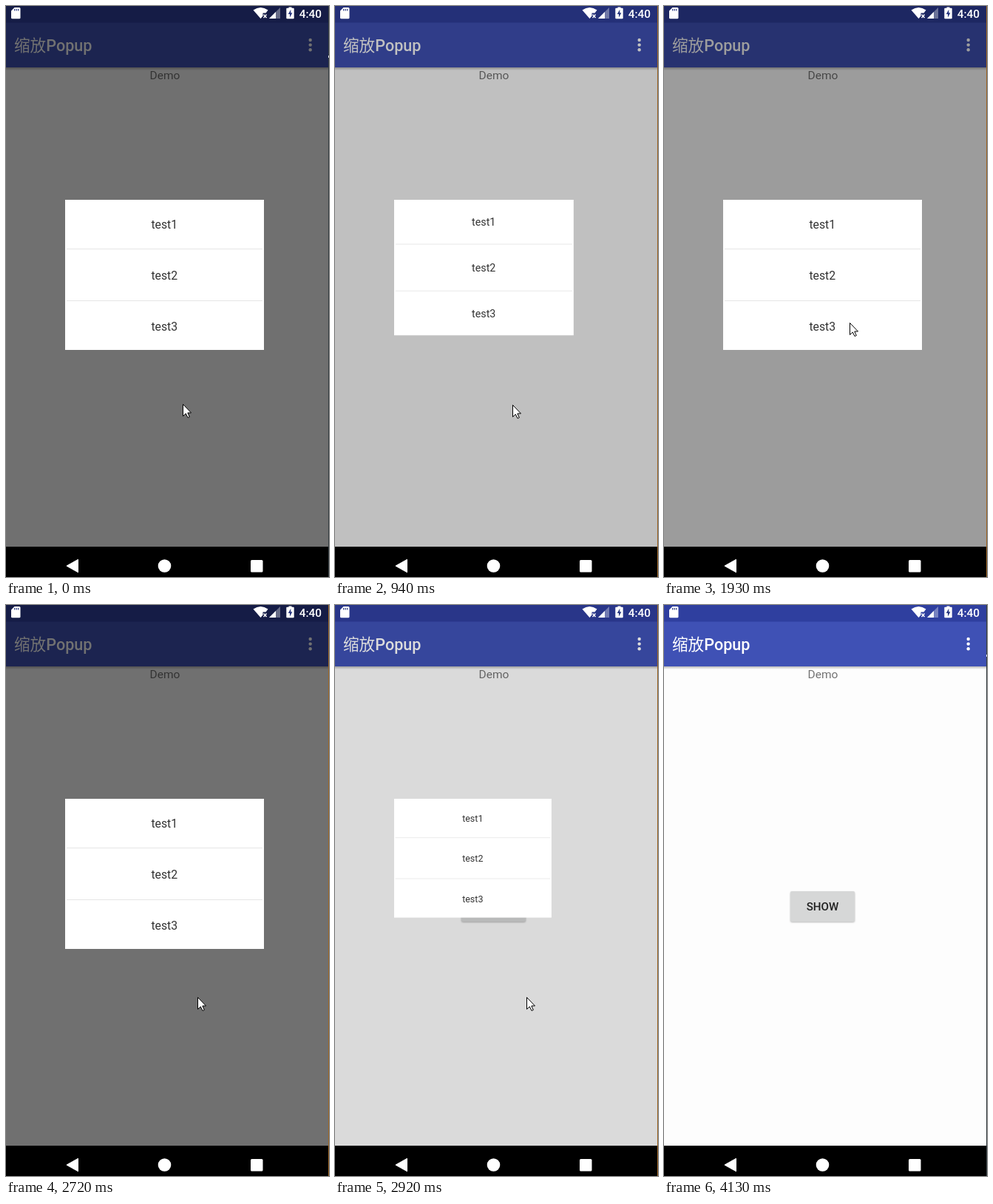
Write an HTML page that moves like this. It is 437 by 772 pixels and loops after 4220 ms.

```html
<!DOCTYPE html>
<html lang="zh">
<head>
<meta charset="utf-8">
<title>Popup</title>
<style>
  html, body { margin: 0; width: 100%; height: 100%; overflow: hidden; background: #000; }
  svg { display: block; width: 437px; height: 772px; }
  text { font-family: Roboto, "Noto Sans CJK SC", "Noto Sans CJK", sans-serif; }
  .medium { font-weight: 500; }
  .center { text-anchor: middle; }
</style>
</head>
<body>
<svg viewBox="0 0 437 772" xmlns="http://www.w3.org/2000/svg">
  <defs>
    <linearGradient id="drop" x2="0" y2="1">
      <stop stop-color="#000" stop-opacity=".34"/>
      <stop offset="1" stop-color="#000" stop-opacity="0"/>
    </linearGradient>
    <filter id="soft" x="-10%" y="-20%" width="120%" height="140%"><feGaussianBlur stdDeviation="1"/></filter>
  </defs>

  <!-- page -->
  <rect width="437" height="772" fill="#fdfdfd"/>
  <rect y="82" width="437" height="5" fill="url(#drop)"/>
  <rect width="437" height="83" fill="#3f51b5"/>
  <rect width="437" height="22.5" fill="#2f3f9f"/>
  <text x="11" y="61" font-size="21.6" fill="#fff">缩放<tspan class="medium">Popup</tspan></text>
  <g fill="#fff">
    <circle cx="411.7" cy="46" r="2.2"/><circle cx="411.7" cy="52.6" r="2.2"/><circle cx="411.7" cy="59.2" r="2.2"/>
  </g>
  <text class="center" x="215" y="99" font-size="15.5" fill="#737373">Demo</text>
  <rect id="shadow" x="171" y="388" width="87" height="41" rx="2" filter="url(#soft)"/>
  <rect x="171" y="387" width="87" height="41" rx="2" fill="#d6d7d7"/>
  <text class="center medium" x="214.5" y="412.6" font-size="15.1" fill="#212121">SHOW</text>

  <rect id="scrim" width="437" height="731"/>

  <!-- status icons -->
  <g fill="#fff">
    <path d="M11.5 2H18a1.5 1.5 0 0 1 1.5 1.5v12.300a1.500 1.500 0 0 1-1.500 1.500H8.500A1.500 1.500 0 0 1 7 15.800V6.500Z"/>
    <path d="M334.500 5.500Q344.500-1.500 354.500 5.500L351.500 9.500H347.500V13.500L344.500 17Z"/>
    <path d="M348.500 11.500l4 4.500m0-4.500l-4 4.500" stroke="#fff" stroke-width="1.400"/>
    <path d="M371 2V17H356Z" opacity=".35"/>
    <path d="M365 8V17H356Z"/>
    <path d="M382.500 2.800V1.500h4V2.800h2.200a1 1 0 0 1 1 1V16.300a1 1 0 0 1-1 1h-8.400a1 1 0 0 1-1-1V3.800a1 1 0 0 1 1-1Z"/>
    <text class="medium" x="396.700" y="15.500" font-size="15.400">4:40</text>
  </g>
  <path d="M11.700 4v2.600M14.200 4v2.600M16.700 4v2.600" stroke="#26357f" stroke-width="1.200"/>
  <path d="M385.300 4.800L381.800 11h2.200v4.500l3.400-6.300h-2.100Z" fill="#26357f"/>

  <!-- popup, rows are filled in by the script -->
  <g id="popup">
    <rect width="269" height="203" fill="#fff"/>
    <path d="M2 66.500H267M2 136.500H267" stroke="#e6e6e6"/>
  </g>

  <!-- navigation bar -->
  <rect y="731" width="437" height="41"/>
  <g fill="#fff">
    <path d="M82 757L97.500 748.300V765.700Z" stroke="#fff" stroke-linejoin="round"/>
    <circle cx="214.500" cy="757" r="8.800"/>
    <rect x="331" y="749" width="16.500" height="16.500" rx="1.500"/>
  </g>

  <rect id="edge" x="436" width="1" height="772"/>
  <rect id="tick" x="436" y="67" width="1" height="3" fill="#ddd"/>
  <path id="cursor" d="M.5 .5V16.500L4.300 13L7 18.500L9.300 17.500L6.800 12H11.500Z" fill="#fff" stroke="#000"/>
</svg>
<script>
const LOOP = 4220, DIM = 0.556;
const OPEN = 1708, FIRST_CLOSE = 840, SECOND_CLOSE = 2770;
const CURSOR = [ // time, x, y
  [0, 239, 538], [30, 240, 538], [50, 240, 539], [990, 240, 539],
  [1320, 251, 428], [1980, 251, 428], [2200, 259, 522], [2290, 259, 530],
  [3150, 259, 530], [3230, 262, 538], [3540, 361, 773], [LOOP, 361, 773]
];
const el = id => document.getElementById(id);
const [popup, scrim, shadow, edge, tick, cursor] =
  ['popup', 'scrim', 'shadow', 'edge', 'tick', 'cursor'].map(el);

['test1', 'test2', 'test3'].forEach((label, i) => {
  const row = document.createElementNS('http://www.w3.org/2000/svg', 'text');
  row.textContent = label;
  row.setAttribute('class', 'center');
  row.setAttribute('x', 134.3);
  row.setAttribute('y', 38.6 + 69 * i);
  row.setAttribute('font-size', 15.8);
  row.setAttribute('fill', '#333');
  popup.append(row);
});

const progress = (t, start, length) => Math.min(1, Math.max(0, (t - start) / length));
const smooth = p => (1 - Math.cos(Math.PI * p)) / 2;
const decelerate = p => 1 - (1 - p) ** 2;

function closing(t, start, first, last) {
  if (t < first) return { scale: 1, dim: 1 };
  if (t >= last) return { scale: 0, dim: 0 };
  return {
    scale: 1 - smooth(progress(t, start, 500)),
    dim: 1 - decelerate(progress(t, start, 300))
  };
}

function popupState(t) {
  if (t < OPEN) return closing(t, FIRST_CLOSE, 880, 1330);
  if (t < 2210) return {
    scale: smooth(progress(t, OPEN + 12, 200)),
    dim: decelerate(progress(t, OPEN, 500))
  };
  return closing(t, SECOND_CLOSE, 2810, 3220);
}

function cursorAt(t) {
  const i = CURSOR.findIndex(k => k[0] > t);
  const [t0, x0, y0] = CURSOR[i - 1], [t1, x1, y1] = CURSOR[i];
  const p = (t - t0) / (t1 - t0);
  return [Math.floor(x0 + (x1 - x0) * p), Math.floor(y0 + (y1 - y0) * p)];
}

function draw(t) {
  const { scale, dim } = popupState(t);
  popup.style.display = scale > 0.002 ? '' : 'none';
  popup.setAttribute('transform', `translate(80 262) scale(${scale})`);
  scrim.setAttribute('opacity', DIM * dim);

  const pressed = t >= 1700 && t < 2000;
  shadow.setAttribute('opacity', pressed ? 0.45 : 0.28);
  shadow.setAttribute('y', pressed ? 389 : 388);

  const warm = t >= 670 && t < 4130;
  edge.setAttribute('fill', warm ? '#9a6424' : '#333c40');
  tick.style.display = warm ? 'none' : '';
  cursor.setAttribute('transform', `translate(${cursorAt(t)})`);
}

const began = performance.now();
function frame() {
  draw((performance.now() - began) % LOOP);
  requestAnimationFrame(frame);
}
frame();
</script>
</body>
</html>
```
